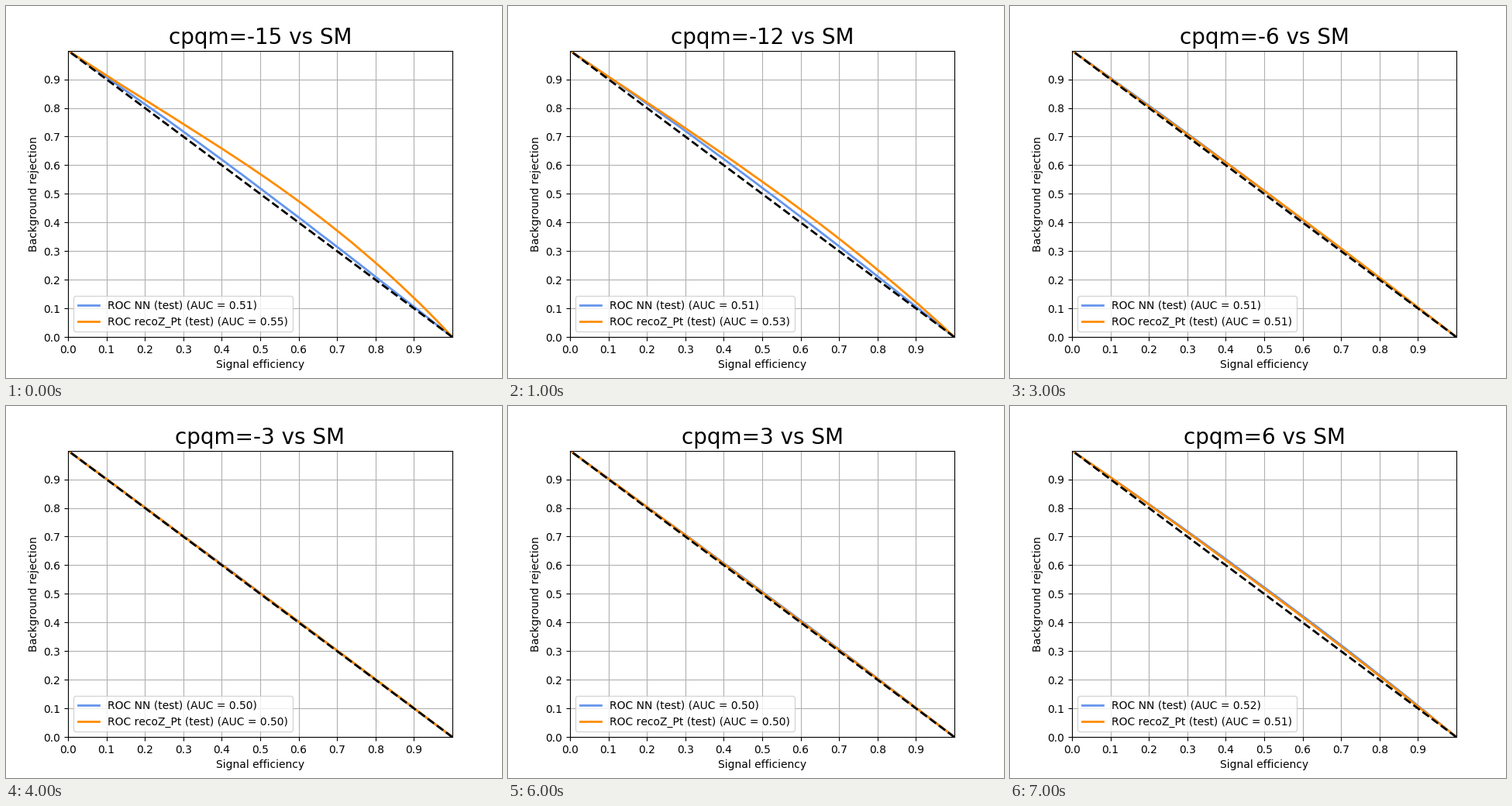
Animation, 640 px wide and 480 px high, one loop 8000 ms. Source, as a matplotlib script:

```python
import numpy as np
import matplotlib.pyplot as plt
from matplotlib.animation import FuncAnimation

plt.rcParams["text.kerning_factor"] = 6  # unkerned text

STEPS = 8
x = np.linspace(0, 1, 201)


def nn_shape(c):
    """Area gained over the diagonal and skew of the bump; gain saturates."""
    gain = 2.75e-4 * c**2 * np.exp(-c**2 / 140)
    return gain * (2 if c > 0 else 1), 0.02 * (c + 3)


def pt_shape(c):
    """As above, but the gain keeps growing with the square of the coupling."""
    return 2.05e-4 * c**2 * (1.65 if c > 0 else 1), max(-c, 0) / 25


def roc(area, skew, seed):
    """Diagonal plus a skewed parabola and a little sampling noise."""
    bump = 6 * area * x * (1 - x) * (1 + skew * (2 * x - 1))
    walk = np.cumsum(np.random.default_rng(seed).normal(0, 0.00012, x.size))
    return 1 - x + bump + walk - walk[0] - x * (walk[-1] - walk[0])


fig, ax = plt.subplots(figsize=(6.4, 4.8), dpi=100)
nn_line, = ax.plot([], [], color="cornflowerblue", lw=2, label="NN")
pt_line, = ax.plot([], [], color="darkorange", lw=2, label="recoZ_Pt")
ax.plot([1, 0], [0, 1], "k--", lw=2)
ticks = np.arange(0, 1, 0.1)
ax.set(xlim=(0, 1), ylim=(0, 1), xticks=ticks, yticks=ticks,
       xlabel="Signal efficiency", ylabel="Background rejection")
ax.grid(True)
title = ax.set_title("", fontsize=20)
labels = ax.legend(loc="lower left").get_texts()
curves = list(zip((nn_line, pt_line), labels, (nn_shape, pt_shape)))


def update(i):
    coupling = 3 * i - 15
    title.set_text(f"cpqm={coupling} vs SM")
    for k, (line, label, shape) in enumerate(curves):
        area, skew = shape(coupling)
        line.set_data(x, roc(area, skew, 2 * i + k))
        label.set_text(f"ROC {line.get_label()} (test) (AUC = {0.5 + area:.2f})")
    return nn_line, pt_line, title, *labels


anim = FuncAnimation(fig, update, frames=STEPS, interval=1000, repeat=True)
plt.show()
```
